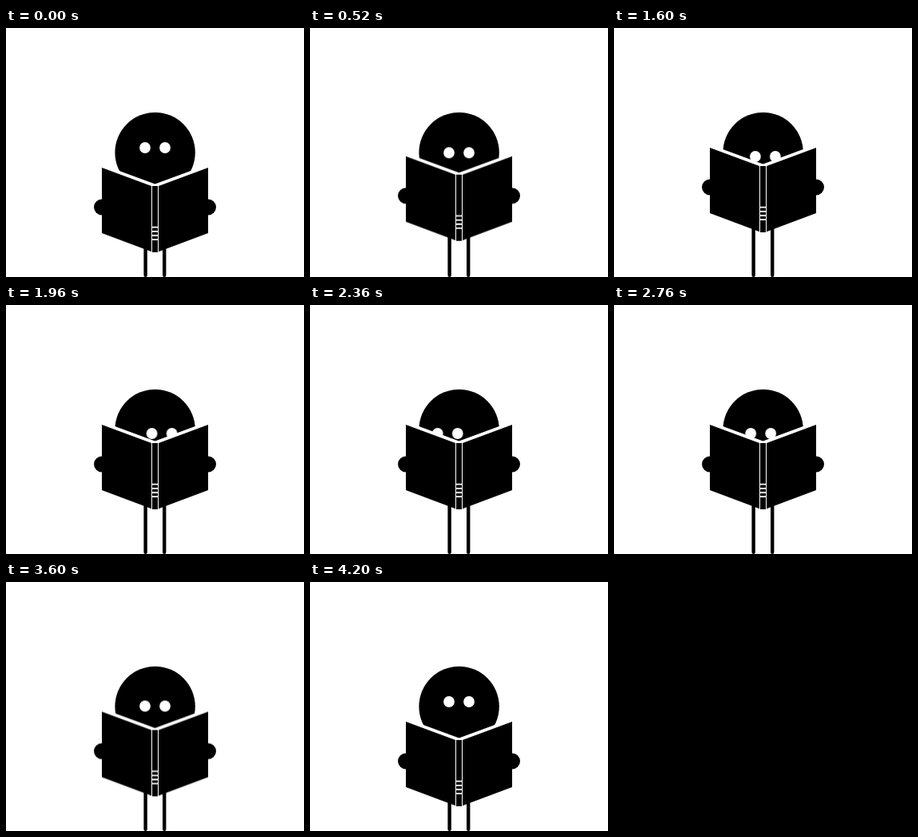
These frames come from a looping animation (373 px wide and 312 px high, 4.24 s). An HTML page:

```html
<!DOCTYPE html>
<html lang="en">
<head>
<meta charset="utf-8">
<title>Reader</title>
<style>
  html, body { margin: 0; width: 100%; height: 100%; overflow: hidden; background: #fff; }
  svg { display: block; width: 100%; height: 100%; }
  #lids { transform-origin: 186.5px 150px; }
</style>
</head>
<body>
<svg viewBox="0 0 373 312">
  <path d="M174.6 220V309.7M198.2 220V309.7" stroke="#000" stroke-width="4.4" stroke-linecap="round"/>
  <circle cx="186.6" cy="156" r="50.2"/>
  <g id="eyes">
    <g id="lids" fill="#fff">
      <circle cx="174" cy="150" r="6.9"/>
      <circle cx="199" cy="150" r="6.9"/>
    </g>
  </g>
  <g id="book">
    <circle cx="120" cy="224.5" r="10"/>
    <circle cx="253" cy="224.5" r="10"/>
    <path fill="#fff" d="M120 171 186.5 195.4 253 171V250L186.5 274 120 250Z"/>
    <path d="M120 175 182 198H191L253 175V257L191 280.2 189.5 281H183.5L182 280.2 120 257Z"/>
    <path d="M182.5 197V281M190.5 197V281" stroke="#fff"/>
    <path d="M183 249.7h7m-7 5.2h7m-7 5.1h7m-7 5.1h7" stroke="#fff" stroke-width="1.8"/>
  </g>
</svg>
<script>
  const LOOP = 4240, TICK = 40;
  const SWEEP = 280, REACH = 20;

  // Linear tweens between [time, transform] rows, held on a 40 ms tick.
  function play(id, rows) {
    const frames = rows.map(([time, transform], i) => {
      const end = i + 1 < rows.length ? rows[i + 1][0] : time + TICK;
      return { offset: time / LOOP, transform, easing: `steps(${(end - time) / TICK}, end)` };
    });
    document.getElementById(id).animate(frames, { duration: LOOP, iterations: Infinity });
  }

  const move = (x, y) => `translate(${x}px, ${y}px)`;
  const rest = move(0, 0);

  play("book", [
    [0, rest], [360, rest], [640, move(0, -25)],
    [3440, move(0, -25)], [3760, rest], [LOOP, rest]
  ]);

  const glances = Array.from({ length: 9 }, (_, i) =>
    [920 + i * SWEEP, move(i % 2 ? -REACH : REACH, 11)]);

  play("eyes", [
    [0, rest], [360, rest], [640, move(0, 11)],
    ...glances,
    [3440, move(0, 11)], [3760, rest], [LOOP, rest]
  ]);

  play("lids", [
    [0, "scaleY(1)"], [4040, "scaleY(1)"], [4120, "scaleY(0.1)"],
    [4200, "scaleY(1)"], [LOOP, "scaleY(1)"]
  ]);
</script>
</body>
</html>
```
